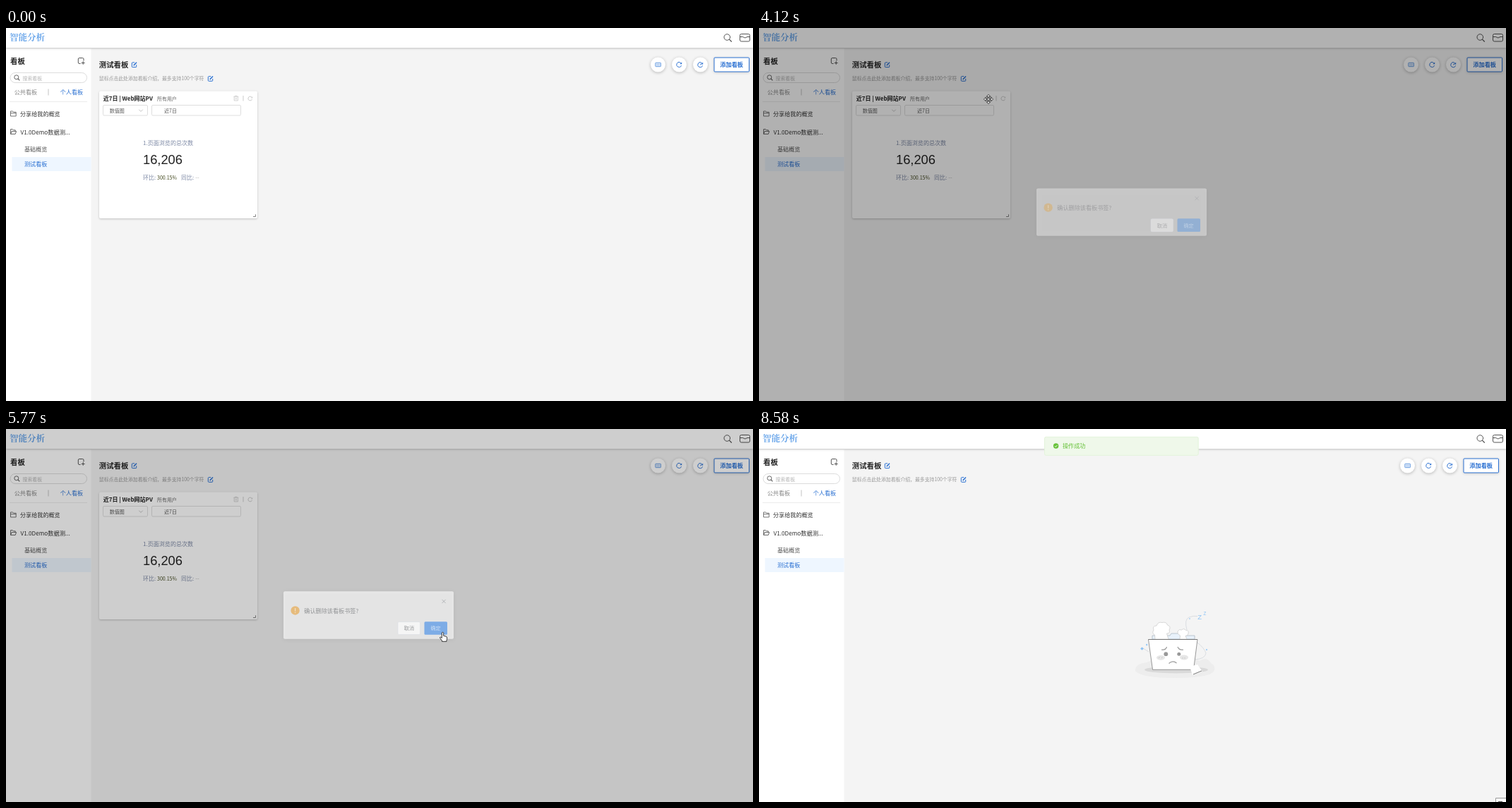
An HTML page with a canvas for the animation above (8.61 s loop, 1058 by 529 pixels).

```html
<!DOCTYPE html>
<html lang="zh-CN">
<head>
<meta charset="utf-8">
<style>
html, body { margin: 0; width: 100%; height: 100%; overflow: hidden; background: #f4f4f4; }
canvas { display: block; width: 1058px; height: 529px; }
</style>
</head>
<body>
<canvas id="stage" width="1058" height="529"></canvas>
<script>
const c = document.getElementById('stage').getContext('2d');
const LOOP = 8610;
const SANS = '"Noto Sans CJK SC", "Noto Sans CJK", "Noto Sans", sans-serif';
const SERIF = '"Noto Serif CJK SC", "Noto Sans CJK SC", "Noto Sans CJK", serif';
const ARIAL = '"Liberation Sans", sans-serif';
const BLUE = '#2a70d2', SLATE = '#7d89a5';

const clamp = v => Math.max(0, Math.min(1, v));
const smooth = p => p * p * (3 - 2 * p);
const easeOut = p => 1 - (1 - p) ** 2;
const easeIn = p => p ** 1.6;

// CSS "ease": cubic-bezier(.25, .1, .25, 1)
function ease(x) {
  if (x <= 0 || x >= 1) return clamp(x);
  let lo = 0, hi = 1;
  for (let i = 0; i < 20; i++) {
    const s = (lo + hi) / 2, r = 1 - s;
    if (.75 * r * r * s + .75 * r * s * s + s ** 3 < x) lo = s; else hi = s;
  }
  const s = lo, r = 1 - s;
  return .3 * r * r * s + 3 * r * s * s + s ** 3;
}
const fade = (t, start, len) => ease((t - start) / len);

// y is the vertical middle of the glyphs
function text(str, x, y, size, color, weight = 400, font = SANS) {
  c.font = `${weight} ${size}px ${font}`;
  c.fillStyle = color;
  c.fillText(str, x, y + size * .38);
}
function rect(x, y, w, h, fill, r = 0, stroke) {
  c.beginPath();
  c.roundRect(x, y, w, h, r);
  paint(fill, stroke);
}
function paint(fill, stroke, width = 1) {
  if (fill) { c.fillStyle = fill; c.fill(); }
  if (stroke) { c.strokeStyle = stroke; c.lineWidth = width; c.stroke(); }
}
function path(d, fill, stroke, width = 1) {
  const p = new Path2D(d);
  if (fill) { c.fillStyle = fill; c.fill(p); }
  if (stroke) { c.strokeStyle = stroke; c.lineWidth = width; c.stroke(p); }
}
function oval(x, y, rx, ry, fill, stroke, width) {
  c.beginPath();
  c.ellipse(x, y, rx, ry, 0, 0, Math.PI * 2);
  paint(fill, stroke, width);
}
function at(x, y, draw) {
  c.save();
  c.translate(x, y);
  draw();
  c.restore();
}
function shadowed(color, blur, dy, draw) {
  c.save();
  c.shadowColor = color;
  c.shadowBlur = blur;
  c.shadowOffsetY = dy;
  draw();
  c.restore();
}

function magnifier(x, y, r, color, width) {
  oval(x, y, r, r, null, color, width);
  const a = r * .72, b = r * 1.5;
  path(`M${x + a} ${y + a}L${x + b} ${y + b}`, null, color, width * 1.3);
}
function editIcon(x, y) {
  at(x, y, () => {
    path('M4.5.9H1.6Q.6.9.6 1.9V6.8Q.6 7.6 1.6 7.6H6.2Q7 7.6 7 6.8V4.2', null, BLUE, 1);
    path('M3 5.2L7.3.7', null, BLUE, 1.5);
  });
}
function refreshIcon(x, y, r, color) {
  c.beginPath();
  c.arc(x, y, r, .35, Math.PI * 2 - .7);
  paint(null, color, 1);
  path(`M${x + r + .5} ${y - r}v${r * .8}h${-r * .8}z`, color);
}

function header() {
  shadowed('rgba(0,0,0,.22)', 3, 1, () => rect(0, 0, 1058, 28, '#fff'));
  text('智能分析', 5, 13.5, 12.5, '#6aa6ea', 900, SERIF);
  magnifier(1021.3, 13, 4.3, '#555', 1);
  rect(1039.5, 8.5, 14, 10.5, null, 2, '#555');
  path('M1040 12.5H1043.5Q1046.8 15.5 1050 12.5H1053.5', null, '#555', 1);
}

function sidebar() {
  rect(0, 29, 120.5, 500, '#fff');
  text('看板', 6, 47.5, 10.4, '#222', 700);
  path('M105.5 50.5H103.8Q102.3 50.5 102.3 49V44Q102.3 42.5 103.8 42.5H108.5Q110 42.5 110 44V46.5M106.8 49.5H111.6M109.2 47.1V51.9', null, '#555', 1);
  rect(6, 63.5, 108.5, 14, '#fff', 7, '#dcdcdc');
  magnifier(14.8, 69.8, 3, '#555', .9);
  text('搜索看板', 23.5, 71, 6.9, '#b4b4b4');
  text('公共看板', 11.7, 91, 8.1, '#888');
  rect(59.5, 86.5, 1, 9, '#c4c4c4');
  text('个人看板', 76.7, 91, 8.1, BLUE);
  rect(5, 104, 110, 1, '#ececec');
  path('M6.5 118H9.6L10.6 119.3H14.2V125H6.5ZM6.5 120.8H14.2', null, '#666', .9);
  text('分享给我的概览', 20, 121.5, 8.1, '#333');
  path('M6.6 150.4V143.6H9.4L10.4 144.8H13.2V146.4M6.6 150.4L8 146.6H14.6L13.2 150.4Z', null, '#555', .9);
  text('V1.0Demo数据测...', 20.5, 147.7, 8.2, '#333');
  text('基础概览', 26, 172, 8.1, '#555');
  rect(8.5, 183, 112, 20, '#eef6ff');
  text('测试看板', 26, 193, 8.1, BLUE);
}

function toolbar(dx) {
  at(dx, 0, () => {
    for (const x of [923.5, 953.5, 983.5])
      shadowed('rgba(0,0,0,.25)', 4, 1, () => oval(x, 52, 10.5, 10.5, '#fff'));
    rect(919.8, 49.3, 7.6, 5.4, '#eaf2fd', .6, '#6c9fe2');
    path('M921 51.3H926.4M921 53H926.4', null, '#8fb5e8', .7);
    refreshIcon(953.3, 52, 3.4, BLUE);
    refreshIcon(983.3, 52.2, 3.4, BLUE);
    path('M983 52.4L985 50.6', null, BLUE, 1);
    shadowed('rgba(0,0,0,.2)', 4, 1, () => rect(1003, 42, 49.5, 20, '#fff', 1));
    rect(1003, 42, 49.5, 20, null, 1, BLUE);
    text('添加看板', 1011.3, 52, 8.2, BLUE, 700);
  });
}

function title() {
  text('测试看板', 131.8, 52, 10.4, '#222', 700);
  editIcon(177.7, 48);
  text('鼠标点击此处添加看板介绍，最多支持100个字符', 131.8, 71.5, 6.87, '#999');
  editIcon(285.7, 67.7);
}

function card(hover) {
  shadowed('rgba(0,0,0,.22)', 3, 1, () => rect(132, 89.5, 224, 180.5, '#fff', 2));
  text('近7日 | Web网站PV', 137.7, 100, 8, '#222', 700);
  text('所有用户', 214, 100, 6.95, '#666');
  path('M322.3 97.3H329.3M324.4 97V96.3H327.2V97M323.2 97.5V103H328.4V97.5M324.6 99.3H327M324.6 101H327', null, hover ? '#8a8a8a' : '#c8c8c8', .8);
  rect(335.5, 96, 1, 7.5, '#ccc');
  refreshIcon(345.8, 100, 2.9, '#ccc');
  rect(137.5, 109.5, 63, 14.5, '#fff', 1.5, '#dedede');
  text('数值图', 146.7, 117, 7, '#555');
  path('M188.3 115.7L191 118.4 193.7 115.7', null, '#bbb', .9);
  rect(206.5, 109.5, 126, 14.5, '#fff', 1.5, '#dedede');
  text('近7日', 224, 117, 7, '#555');
  text('1.页面浏览的总次数', 194, 163.3, 8.05, SLATE);
  text('16,206', 194, 186, 18.3, '#222', 400, ARIAL);
  text('环比:', 194, 212, 8, SLATE);
  text('300.15%', 214, 212, 7.05, '#444a20', 500);
  text('同比:', 248, 212, 8, SLATE);
  text('--', 268.3, 212, 7.5, '#aaa');
  path('M350 267.5H353.5V264.3', null, '#777', .9);
}

function emptyState() {
  path('M533 343Q532 333 549 331Q566 323 590 325Q610 321 624 329Q634 322 640 332Q648 337 644 344Q636 353 589 353Q540 353 533 343Z', '#ededed');
  oval(591, 341.5, 45, 5, '#d9d9d9');
  path('M606 285Q602 270 609 267Q615 264.5 621 265.5M621 303Q631 311 633 318Q632 326 617 327M552 316L544 311', null, '#d3d7dc', .8);
  path('M557 298V293H582L584 290H594L596 293H617V298Z', '#e9f2fb', '#aeb9c5', .8);
  path('M561 298L560.5 292Q556 290 559 285Q557 279 563 279Q565 273 571 274.5Q577 273 578.5 278Q584 280 581 285Q583 290 577.5 290L580 298Z', '#fff', '#cfcfcf', .8);
  path('M596 298L596.5 293Q592 291 593 287Q595 283 598.5 285Q602 282 604.5 285.5Q609 285 608 290Q608 293 604 293.5L606 298Z', '#fff', '#cfcfcf', .8);
  path('M551.5 298.5H621L615.5 341.3H557.5Z', '#fff', '#8c8c8c', .9);
  path('M551.5 298.5H621', null, '#777', 1.1);
  path('M610 337L621 334 628 344 614 349Z', '#fff');
  path('M615 348L627 343', null, '#888', 1.3);
  oval(569, 324.3, 6, 3.4, '#e6e6e6');
  oval(602, 324, 6, 3.4, '#e6e6e6');
  path('M566 325L567.5 323.5M570 325L571.5 323.5M600 325.5V324M603 325.5V324', null, '#bbb', .8);
  oval(576.3, 319.2, 2.9, 2.9, '#999');
  oval(594.8, 319.2, 2.5, 2.5, '#999');
  path('M570 313Q576 314 577.5 309M593 309Q595 314 601 313M580.5 332.5Q586 327.5 591.5 332', null, '#999', 1.2);
  for (const [x, y, r] of [[542.5, 311.5, 2.3], [549.2, 306, 1.4], [634, 313, 1.2], [610, 269, 1]])
    path(`M${x} ${y - r}L${x + r} ${y} ${x} ${y + r} ${x - r} ${y}Z`, '#8cc3f5');
  text('Z', 621.3, 266.5, 9.5, '#8cc3f5', 400, ARIAL);
  text('Z', 629.5, 261.2, 6.3, '#8cc3f5', 400, ARIAL);
}

function dialog(show, pressed) {
  if (show <= 0) return;
  c.save();
  c.globalAlpha = show;
  c.translate(0, -11.5 * (1 - show));
  shadowed('rgba(0,0,0,.1)', 6, 1, () => rect(393, 234.7, 241, 67.3, '#fff', 2));
  path('M617.5 246.2L622.7 251.4M622.7 246.2L617.5 251.4', null, '#909399', .9);
  oval(409.6, 261.8, 6.2, 6.2, '#e6a23c');
  rect(409.1, 258.3, 1.1, 4.6, '#fff');
  rect(409.1, 264.1, 1.1, 1.2, '#fff');
  text('确认删除该看板书签?', 422.3, 262, 8.13, '#606266');
  rect(555, 277.9, 31.5, 18, '#fff', 1.5, '#dcdfe6');
  text('取消', 563.8, 287, 7.2, '#606266');
  rect(592.5, 277.5, 32.5, 18.7, pressed ? '#3579cd' : '#3f8be8', 1.5);
  text('确定', 601.4, 287, 7.2, '#fff', 500);
  c.restore();
}

function message(t) {
  if (t <= 0) return;
  c.save();
  c.globalAlpha = fade(t, 0, 300);
  c.translate(0, -26.5 * (1 - fade(t, 0, 400)));
  rect(404.5, 11.3, 217.7, 26, '#eff8ea', 2, '#e3f3db');
  oval(420.6, 24, 3.7, 3.7, '#67c23a');
  path('M418.8 24.1L420.2 25.5 422.6 22.8', null, '#fff', .9);
  text('操作成功', 430, 24.3, 8.1, '#67c23a');
  c.restore();
}

const SHAPES = {
  arrow: 'M0 0V10.2L2.4 8 4 11.4 5.6 10.7 4.1 7.4H7.2Z',
  hand: 'M-1.2 8.2V1.2A1.2 1.2 0 0 1 1.2 1.2V5L4.6 5.8Q6.1 6.2 6.1 7.6V9.5Q6.1 10.5 5.5 11.5V13H-1V11.8L-3.8 8.2Q-4.4 7.2-3.5 6.8-2.6 6.5-1.2 8.2Z',
  move: 'M0-6.6L2.6-3.8H.8V-.8H3.8V-2.6L6.6 0 3.8 2.6V.8H.8V3.8H2.6L0 6.6-2.6 3.8H-.8V.8H-3.8V2.6L-6.6 0-3.8-2.6V-.8H-.8V-3.8H-2.6Z'
};
// start, end, from x, y, to x, y, easing
const MOVES = [
  [10, 800, 1028, 530, 696, 393, easeOut],
  [1000, 1890, 696, 393, 322, 107.5, smooth],
  [1890, 2270, 321, 111, 325, 101, smooth],
  [4490, 4950, 325, 101, 618.5, 288.3, smooth],
  [7160, 7990, 618.5, 288.3, 1042, 533, easeIn]
];
function cursor(t) {
  if (t < 40 || t >= 7970) return;
  const [t0, t1, x0, y0, x1, y1, f] = MOVES.filter(m => t >= m[0]).pop();
  const p = f(clamp((t - t0) / (t1 - t0)));
  const x = x0 + (x1 - x0) * p, y = y0 + (y1 - y0) * p;
  let kind = 'arrow';
  if (t >= 1900 && t < 4510) kind = t < 2180 || t >= 4020 ? 'move' : 'hand';
  if (t > 4600 && t < 5900 && x > 593 && y > 277) kind = 'hand';
  if (t >= 3620 && t < 3860) oval(x, y, 7, 7, 'rgba(250,238,20,.75)');
  at(x, y, () => path(SHAPES[kind], '#fff', '#222', .9));
}

function cornerBox(t) {
  if (t < 8510) return;
  c.save();
  c.globalAlpha = clamp((t - 8480) / 90);
  rect(1043.5, 523.5, 20, 10, '#fff', 0, '#999');
  rect(1047, 528, 6, 1, '#555');
  c.restore();
}

function draw(t) {
  const done = t >= 5930;
  rect(0, 0, 1058, 529, '#f4f4f4');
  title();
  toolbar(done ? -5 : 0);
  if (done) emptyState();
  else card(t >= 2530 && t < 4020);
  sidebar();
  header();
  const mask = .5 * (fade(t, 4050, 200) - fade(t, 5700, 200));
  if (mask > 0) rect(0, 0, 1058, 529, `rgba(0,0,0,${mask})`);
  dialog(fade(t, 4050, 300) - fade(t, 5700, 300), t >= 5440 && t < 5500);
  message(t - 5930);
  cornerBox(t);
  cursor(t);
}

const begin = performance.now();
function tick() {
  draw((performance.now() - begin) % LOOP);
  requestAnimationFrame(tick);
}
tick();
</script>
</body>
</html>
```
